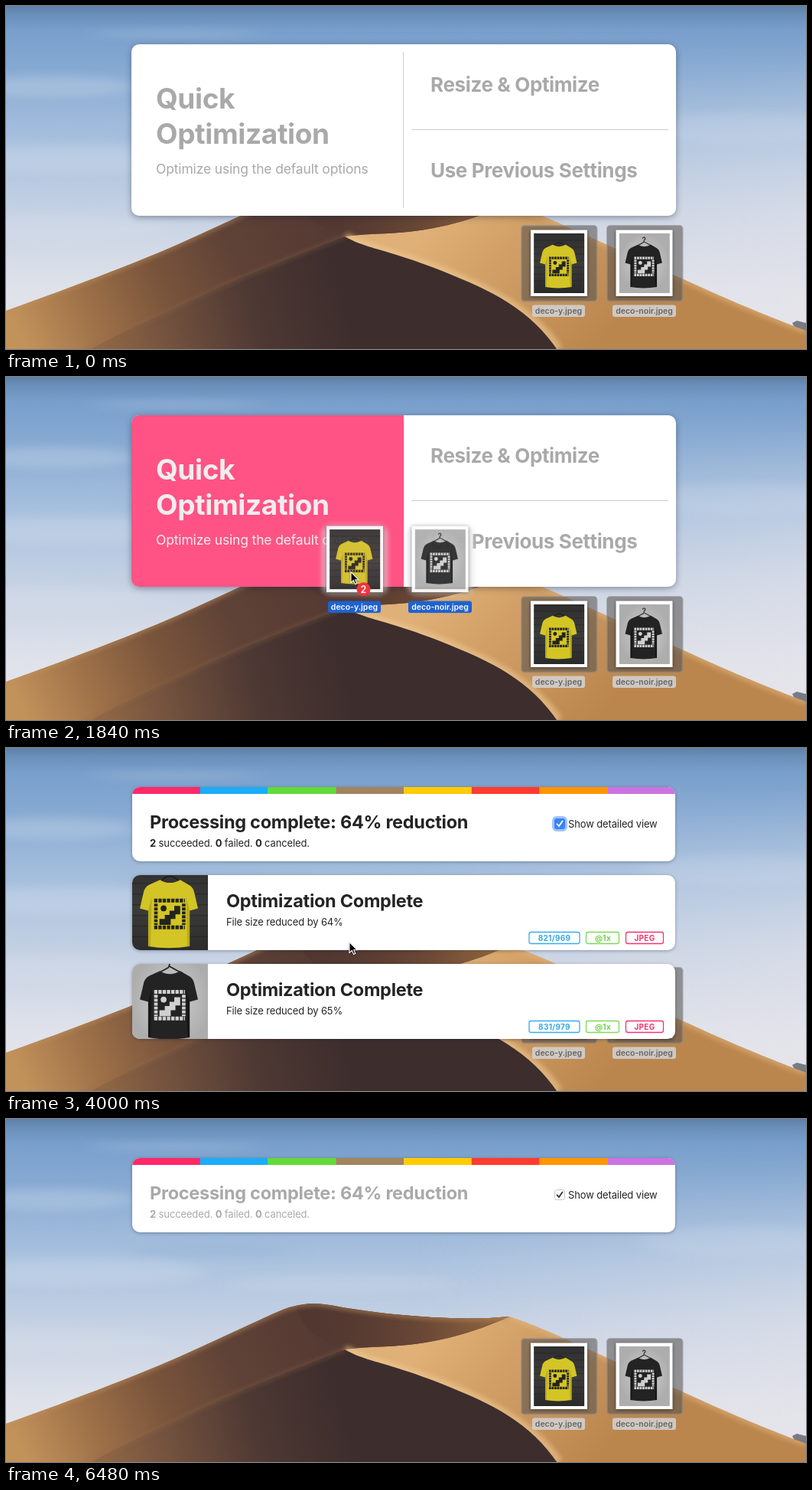
These frames come from a looping animation (1046x448 px, 6560 ms). An HTML page:

```html
<!DOCTYPE html>
<html lang="en">
<head>
<meta charset="utf-8">
<title>Drop to optimize</title>
<style>
html, body { margin: 0; width: 100%; height: 100%; overflow: hidden; background: #a9c1df; }
#stage { display: block; width: 1046px; height: 448px; font-family: Inter, "Liberation Sans", sans-serif; }
.anim { animation: 6560ms linear infinite; }
.step { animation: 6560ms step-end infinite; }

.big { font-size: 37px; font-weight: 700; letter-spacing: -.01em; }
.mid { font-size: 26px; font-weight: 700; letter-spacing: -.014em; }
.lead { font-size: 17.5px; letter-spacing: -.009em; }
.title { font-size: 23.5px; font-weight: 700; letter-spacing: -.012em; fill: #242426; }
.body { font-size: 13px; letter-spacing: -.01em; fill: #242426; }
.tiny { font-size: 11px; fill: #242426; }
.b { font-weight: 700; }
.file { font-size: 10.5px; font-weight: 600; text-anchor: middle; }
.tag { font-size: 10px; font-weight: 700; letter-spacing: .3px; text-anchor: middle; }
.card { filter: drop-shadow(0 1px 2px rgba(20, 30, 50, .35)); }

/* first panel */
#panel { animation-name: panel; }
@keyframes panel { 0%, 42.68% { opacity: 1 } 45.12% { opacity: .07 } 46.34%, 100% { opacity: 0 } }
#hot { animation-name: hot; }
@keyframes hot { 0%, 25.61% { opacity: 0 } 28.66%, 42.67% { opacity: 1 } 42.68%, 100% { opacity: 0 } }
#quick { animation-name: quick; }
@keyframes quick { 0%, 25.61% { fill: #a9a9a9 } 28.66%, 42.67% { fill: #fff } 42.68%, 100% { fill: #222 } }
#other { animation-name: other; }
@keyframes other { 0% { fill: #a9a9a9 } 41.463%, 100% { fill: #222 } }

/* result cards */
#head { animation-name: head; }
@keyframes head { 0%, 41.47% { opacity: 0 } 45.12%, 100% { opacity: 1 } }
#row1 { animation-name: row1; }
@keyframes row1 { 0%, 41.47% { opacity: 0 } 45.12% { opacity: .95 } 46.34%, 82.32% { opacity: 1 } 85.37% { opacity: .5 } 89.02%, 100% { opacity: 0 } }
#row2 { animation-name: row2; }
@keyframes row2 { 0%, 41.47% { opacity: 0 } 45.12% { opacity: .88 } 47.56%, 81.71% { opacity: 1 } 85.37% { opacity: .38 } 89.02%, 100% { opacity: 0 } }
.busy { animation-name: busy; }
@keyframes busy { 0% { opacity: 1 } 52.439%, 100% { opacity: 0 } }
.done { animation-name: done; }
@keyframes done { 0% { opacity: 0 } 52.439%, 100% { opacity: 1 } }
.dim { animation-name: dim; }
@keyframes dim { 0% { fill: #242426 } 98.78%, 100% { fill: #a9a9a9 } }
#on { animation-name: on; }
@keyframes on { 0% { opacity: 1 } 98.78%, 100% { opacity: 0 } }
#off { animation-name: off; }
@keyframes off { 0% { opacity: 0 } 98.78%, 100% { opacity: 1 } }
#ring { animation-name: ring; }
@keyframes ring { 0%, 42.68% { stroke-width: 26px; stroke-opacity: 0 } 45.12% { stroke-width: 14px; stroke-opacity: .32 } 47.56%, 100% { stroke-width: 6px; stroke-opacity: .5 } }

/* pointer and what it carries */
#mover { animation-name: move; }
@keyframes move {
  0%, 5.49% { transform: translate(310px, 105px); }
  8.54% { transform: translate(150px, -35px); }
  10.37% { transform: translate(45px, -45px); animation-timing-function: ease-out; }
  12.2% { transform: translate(0, 0); }
  17.07% { transform: translate(0, 0); animation-timing-function: cubic-bezier(.4, .1, .75, .8); }
  23.17% { transform: translate(-200px, -61px); animation-timing-function: cubic-bezier(.25, .5, .5, 1); }
  29.27%, 75% { transform: translate(-269px, -99px); animation-timing-function: ease-in-out; }
  82.93%, 100% { transform: translate(-60px, 125px); }
}
#drag { animation-name: drag; }
@keyframes drag { 0% { opacity: 0 } 18.29% { opacity: 1 } 41.463%, 100% { opacity: 0 } }
</style>
</head>
<body>
<svg id="stage" viewBox="0 0 1046 448" xmlns="http://www.w3.org/2000/svg">
<defs>
  <linearGradient id="sky" x1="0" y1="0" x2="0" y2="1">
    <stop offset="0" stop-color="#5e80a6"/><stop offset=".025" stop-color="#6a8fb9"/>
    <stop offset=".07" stop-color="#789fcb"/><stop offset=".18" stop-color="#86a9d2"/>
    <stop offset=".42" stop-color="#acc3df"/><stop offset=".62" stop-color="#c8d3e4"/>
    <stop offset=".82" stop-color="#dfe2ea"/><stop offset="1" stop-color="#e6e6ea"/>
  </linearGradient>
  <linearGradient id="haze"><stop offset=".5" stop-color="#e6e4ea" stop-opacity="0"/><stop offset="1" stop-color="#e6e4ea" stop-opacity=".5"/></linearGradient>
  <linearGradient id="hazeY" x1="0" y1="0" x2="0" y2="1"><stop offset=".1" stop-color="#000"/><stop offset=".6" stop-color="#fff"/></linearGradient>
  <mask id="low"><rect width="1046" height="448" fill="url(#hazeY)"/></mask>
  <linearGradient id="back" gradientUnits="userSpaceOnUse" x1="400" y1="250" x2="20" y2="430">
    <stop offset="0" stop-color="#553a33"/><stop offset=".3" stop-color="#5f4237"/>
    <stop offset=".55" stop-color="#7a553c"/><stop offset=".8" stop-color="#a2744a"/><stop offset="1" stop-color="#c2925b"/>
  </linearGradient>
  <linearGradient id="shade" gradientUnits="userSpaceOnUse" x1="400" y1="250" x2="658" y2="268">
    <stop offset="0" stop-color="#4b322d" stop-opacity=".4"/><stop offset=".6" stop-color="#6d4a36"/><stop offset="1" stop-color="#94683f"/>
  </linearGradient>
  <linearGradient id="lit" gradientUnits="userSpaceOnUse" x1="560" y1="280" x2="760" y2="460">
    <stop offset="0" stop-color="#dfb077"/><stop offset=".35" stop-color="#d2a067"/><stop offset="1" stop-color="#bb864e"/>
  </linearGradient>
  <linearGradient id="front" gradientUnits="userSpaceOnUse" x1="60" y1="470" x2="440" y2="370">
    <stop offset="0" stop-color="#a87a4c"/><stop offset=".35" stop-color="#795640"/>
    <stop offset=".7" stop-color="#4d3833"/><stop offset="1" stop-color="#3d2d2d"/>
  </linearGradient>
  <linearGradient id="wall" x1="0" y1="0" x2="0" y2="1"><stop offset="0" stop-color="#2e2f2e"/><stop offset=".5" stop-color="#3b3c3a"/><stop offset="1" stop-color="#292a29"/></linearGradient>
  <radialGradient id="plaster"><stop offset="0" stop-color="#d2d2d2"/><stop offset="1" stop-color="#adadad"/></radialGradient>
  <filter id="soft" x="-50%" y="-100%" width="200%" height="300%"><feGaussianBlur stdDeviation="14 6"/></filter>
  <filter id="glow" x="-20%" y="-20%" width="140%" height="140%"><feGaussianBlur stdDeviation="3"/></filter>
  <filter id="edge" x="-10%" y="-10%" width="120%" height="120%"><feGaussianBlur stdDeviation=".7"/></filter>
  <clipPath id="cutPanel"><rect x="164" y="50" width="712" height="224" rx="10"/></clipPath>
  <clipPath id="cutHead"><rect x="165" y="51" width="710" height="97" rx="10"/></clipPath>
  <clipPath id="cutRow"><rect x="165" y="166" width="710" height="98" rx="10"/></clipPath>
  <path id="crest" d="M0 398C90 366 190 328 250 300L350 254Q374 243 390 242Q405 239 440 246C500 256 590 265 658 258"/>
  <clipPath id="cutLand"><path d="M0 398C90 366 190 328 250 300L350 254Q374 243 390 242Q405 239 440 246C500 256 590 265 658 258C700 271 760 301 886 357Q970 396 1046 424V448H0Z"/></clipPath>

  <!-- shirt photos, 67 by 79 -->
  <path id="shirt" d="M25 15L16 19Q12 21 11 26L8 39L15 41V71Q32 74 50 71V41L57 39L54 26Q53 21 49 19L42 15Q33 20 25 15Z"/>
  <g id="print">
    <path d="M20 32.500H46M20 55H46" fill="none" stroke="currentColor" stroke-width="3.200" stroke-dasharray="2.800 .8"/>
    <path d="M21.500 35V53M45 35V53" fill="none" stroke="currentColor" stroke-width="3" stroke-dasharray="2.500 .8"/>
    <path d="M24.500 53V48H29V44.500H33V41H37V37H42V44H38V48H34V53Z" fill="currentColor"/>
    <circle cx="28" cy="39" r="2.500" fill="currentColor"/>
  </g>
  <g id="yellow">
    <rect width="67" height="79" fill="url(#wall)"/>
    <path d="M0 9H67M0 18H67M0 27H67M0 36H67M0 45H67M0 54H67M0 63H67" stroke="#202120" stroke-width=".6" opacity=".7"/>
    <path d="M26 16Q33 8 41 16" fill="none" stroke="#191919"/>
    <use href="#shirt" fill="#d3c526"/>
    <path d="M15 41L18 29L17 71H15ZM50 41L47 29L48 71H50Z" fill="#a89b17" opacity=".6"/>
    <use href="#print" color="#24241c"/>
  </g>
  <g id="noir">
    <rect width="67" height="79" fill="url(#plaster)"/>
    <path d="M23 17L32 12Q33 11 33 9Q36 7 33.500 5Q31 5 31.500 7M33 11L44 17" fill="none" stroke="#222" stroke-width="1.100"/>
    <use href="#shirt" fill="#232324"/>
    <path d="M15 41L18 29L17 71H15ZM50 41L47 29L48 71H50Z" fill="#0f0f10" opacity=".6"/>
    <use href="#print" color="#d0d0d0"/>
  </g>
  <g id="frames">
    <g filter="drop-shadow(0 1px 2px rgba(0,0,0,.45))" fill="#fff">
      <rect x="686" y="292.500" width="74" height="86.500"/><rect x="797.500" y="292.500" width="74" height="86.500"/>
    </g>
    <svg x="690" y="297" width="66.500" height="78" viewBox="0 0 67 79"><use href="#yellow"/></svg>
    <svg x="801.500" y="297" width="66.500" height="78" viewBox="0 0 67 79"><use href="#noir"/></svg>
  </g>
  <g id="labels">
    <rect x="688" y="390.500" width="69" height="15.500" rx="3"/><rect x="793" y="390.500" width="83" height="15.500" rx="3"/>
    <g class="file" fill="currentColor"><text x="722.500" y="402">deco-y.jpeg</text><text x="834.500" y="402">deco-noir.jpeg</text></g>
  </g>
  <g id="tags" fill="none" stroke-width="1.300">
    <rect x="684" y="240.500" width="66" height="15" rx="2.500" stroke="#35adee"/>
    <rect x="758.500" y="240.500" width="43" height="15" rx="2.500" stroke="#7ed957"/>
    <rect x="810.500" y="240.500" width="49" height="15" rx="2.500" stroke="#f7336c"/>
    <g class="tag"><text x="780.500" y="251.700" fill="#72d44a">@1x</text><text x="835" y="251.700" fill="#f7336c">JPEG</text></g>
  </g>
</defs>

<!-- desktop -->
<rect width="1046" height="448" fill="url(#sky)"/>
<rect width="1046" height="448" fill="url(#haze)" mask="url(#low)"/>
<g filter="url(#soft)" fill="#dfe6f1">
  <ellipse cx="220" cy="36" rx="110" ry="5" opacity=".2"/><ellipse cx="60" cy="105" rx="110" ry="14" opacity=".25"/>
  <ellipse cx="90" cy="200" rx="170" ry="18" opacity=".25"/><ellipse cx="440" cy="215" rx="150" ry="12" opacity=".2"/>
  <ellipse cx="960" cy="160" rx="130" ry="20" opacity=".18"/><ellipse cx="60" cy="290" rx="150" ry="16" opacity=".2"/>
  <ellipse cx="270" cy="172" rx="110" ry="8" fill="#8fb0d6" opacity=".35"/>
</g>
<path d="M1028 414L1034 411L1046 414V425H1034Z" fill="#777b84"/>
<g clip-path="url(#cutLand)">
  <rect y="230" width="1046" height="218" fill="url(#lit)"/>
  <path d="M658 258C700 271 760 301 886 357Q970 396 1046 424" fill="none" stroke="#e3b880" stroke-width="8" filter="url(#glow)" opacity=".6"/>
  <path d="M0 448V230H660L658 258C610 280 560 294 500 297Q465 298 443 301L300 448Z" fill="url(#back)" filter="url(#edge)"/>
  <path d="M380 238H660L658 258C610 280 560 294 500 297Q465 298 443 301Q380 280 380 238Z" fill="url(#shade)" filter="url(#edge)"/>
  <use href="#crest" fill="none" stroke="#c09162" stroke-width="5" filter="url(#glow)" opacity=".7"/>
  <path d="M443 301C470 317 520 326 570 346S686 395 722 448" fill="none" stroke="#f0cb94" stroke-width="12" filter="url(#glow)" opacity=".6"/>
  <path d="M443 301C400 318 320 348 260 376S150 426 90 460H728C690 398 640 374 570 346S470 317 443 301Z" fill="url(#front)" filter="url(#edge)"/>
  <path d="M443 301C400 318 320 348 260 376S150 426 90 460" fill="none" stroke="#8f684a" stroke-width="3" filter="url(#glow)" opacity=".6"/>
</g>
<g fill="#55504f" fill-opacity=".55" stroke="#8d8b8b" stroke-opacity=".6" stroke-width="2">
  <rect x="674" y="287" width="98.500" height="98.500" rx="4"/><rect x="786" y="287" width="98.500" height="98.500" rx="4"/>
</g>
<use href="#frames"/>
<use href="#labels" fill="#d2d0cf" fill-opacity=".9" color="#5c5b5b"/>

<!-- drop panel -->
<g id="panel" class="anim">
  <g filter="drop-shadow(0 2px 4px rgba(20,30,50,.4))"><rect x="164" y="50" width="712" height="224" rx="10" fill="#fff"/></g>
  <path d="M519.500 60V264M530 161.500H866" stroke="#cdcdcd"/>
  <g clip-path="url(#cutPanel)"><rect id="hot" class="anim" x="164" y="50" width="356" height="224" fill="#ff2a68"/></g>
  <g id="quick" class="anim">
    <text class="big" x="196" y="134">Quick</text><text class="big" x="196" y="180">Optimization</text>
    <text class="lead" x="196" y="219">Optimize using the default options</text>
  </g>
  <g id="other" class="step mid"><text x="555" y="112">Resize &amp; Optimize</text><text x="555" y="224">Use Previous Settings</text></g>
</g>

<!-- summary -->
<g id="head" class="anim">
  <g class="card"><rect x="165" y="51" width="710" height="97" rx="10" fill="#fff"/></g>
  <g id="strip" clip-path="url(#cutHead)"></g>
  <g class="step busy">
    <text class="title" x="188" y="105">Images processed</text><text class="tiny" x="410" y="87">0 of 2...</text>
    <rect x="411.500" y="95.500" width="185" height="5.500" rx="2.700" fill="#e6e6e6" stroke="#cfcfcf"/>
    <circle cx="613.500" cy="98.500" r="7.500" fill="#6f6f6f"/><path d="M610.700 95.700l5.600 5.600m0-5.600l-5.600 5.600" stroke="#fff" stroke-width="1.700"/>
  </g>
  <g class="step done">
    <text class="title step dim" x="188" y="105">Processing complete: 64% reduction</text>
    <text class="body step dim" x="188" y="129"><tspan class="b">2</tspan> succeeded. <tspan class="b">0</tspan> failed. <tspan class="b">0</tspan> canceled.</text>
  </g>
  <g id="on" class="step">
    <rect id="ring" class="anim" x="717" y="92" width="14" height="14" rx="3" fill="none" stroke="#3f8cf8" stroke-linejoin="round"/>
    <rect x="717" y="92" width="14" height="14" rx="3" fill="#3b82f6"/>
    <path d="M720.500 99.300L723 102L727.500 95.500" fill="none" stroke="#fff" stroke-width="1.800" stroke-linecap="round"/>
  </g>
  <g id="off" class="step" fill="none">
    <rect x="717.500" y="92.500" width="13" height="13" rx="3" fill="#fff" stroke="#c2c2c2"/>
    <path d="M720.500 99.300L723 102L727.500 95.500" stroke="#333" stroke-width="1.800" stroke-linecap="round"/>
  </g>
  <text class="body" x="735" y="104">Show detailed view</text>
</g>

<!-- file rows -->
<g id="row1" class="anim">
  <g class="card"><rect x="165" y="166" width="710" height="98" rx="10" fill="#fff"/></g>
  <g clip-path="url(#cutRow)"><svg x="165" y="166" width="99" height="98" viewBox="1.500 11 63.900 63.200"><use href="#yellow"/></svg></g>
  <text class="title step busy" x="288" y="208">Optimizing deco-y.jpeg</text>
  <g class="step done"><text class="title" x="288" y="208">Optimization Complete</text><text class="body" x="288" y="232">File size reduced by 64%</text></g>
  <use href="#tags"/><text class="tag" x="717" y="251.700" fill="#35a5e4">821/969</text>
</g>
<g transform="translate(0 116)"><g id="row2" class="anim">
  <g class="card"><rect x="165" y="166" width="710" height="98" rx="10" fill="#fff"/></g>
  <g clip-path="url(#cutRow)"><svg x="165" y="166" width="99" height="98" viewBox="1.500 9 63.900 63.200"><use href="#noir"/></svg></g>
  <text class="title step busy" x="288" y="208">Optimizing deco-noir.jpeg</text>
  <g class="step done"><text class="title" x="288" y="208">Optimization Complete</text><text class="body" x="288" y="232">File size reduced by 65%</text></g>
  <use href="#tags"/><text class="tag" x="717" y="251.700" fill="#35a5e4">831/979</text>
</g></g>

<g id="mover" class="anim">
  <g id="drag" class="step">
    <g fill="#dcdcdc" fill-opacity=".6" filter="url(#glow)"><rect x="680" y="291" width="86" height="91" rx="12"/><rect x="792" y="291" width="86" height="91" rx="12"/></g>
    <use href="#frames" opacity=".9"/>
    <use href="#labels" fill="#1e62d0" color="#fff"/>
    <circle cx="734.500" cy="375" r="9" fill="#f5333f"/><text class="file" x="734.500" y="379.500" fill="#fff" style="font-size:12.500px">2</text>
  </g>
  <path d="M718 352.500v14l3.300-3 2.300 5.100 2.200-1-2.200-4.900h4.400z" fill="#000" stroke="#fff" stroke-width="1.100" filter="drop-shadow(0 1px 1px rgba(0,0,0,.4))"/>
</g>
</svg>
<script>
const hues = ["#ff2968", "#1badf8", "#63da38", "#a2845e", "#ffcc00", "#ff3b30", "#ff9500", "#cc73e1"];
document.getElementById("strip").innerHTML = hues.map((hue, i) =>
  `<rect x="${165 + i * 88.75}" y="51" width="89" height="9" fill="${hue}"/>`).join("");
</script>
</body>
</html>
```
